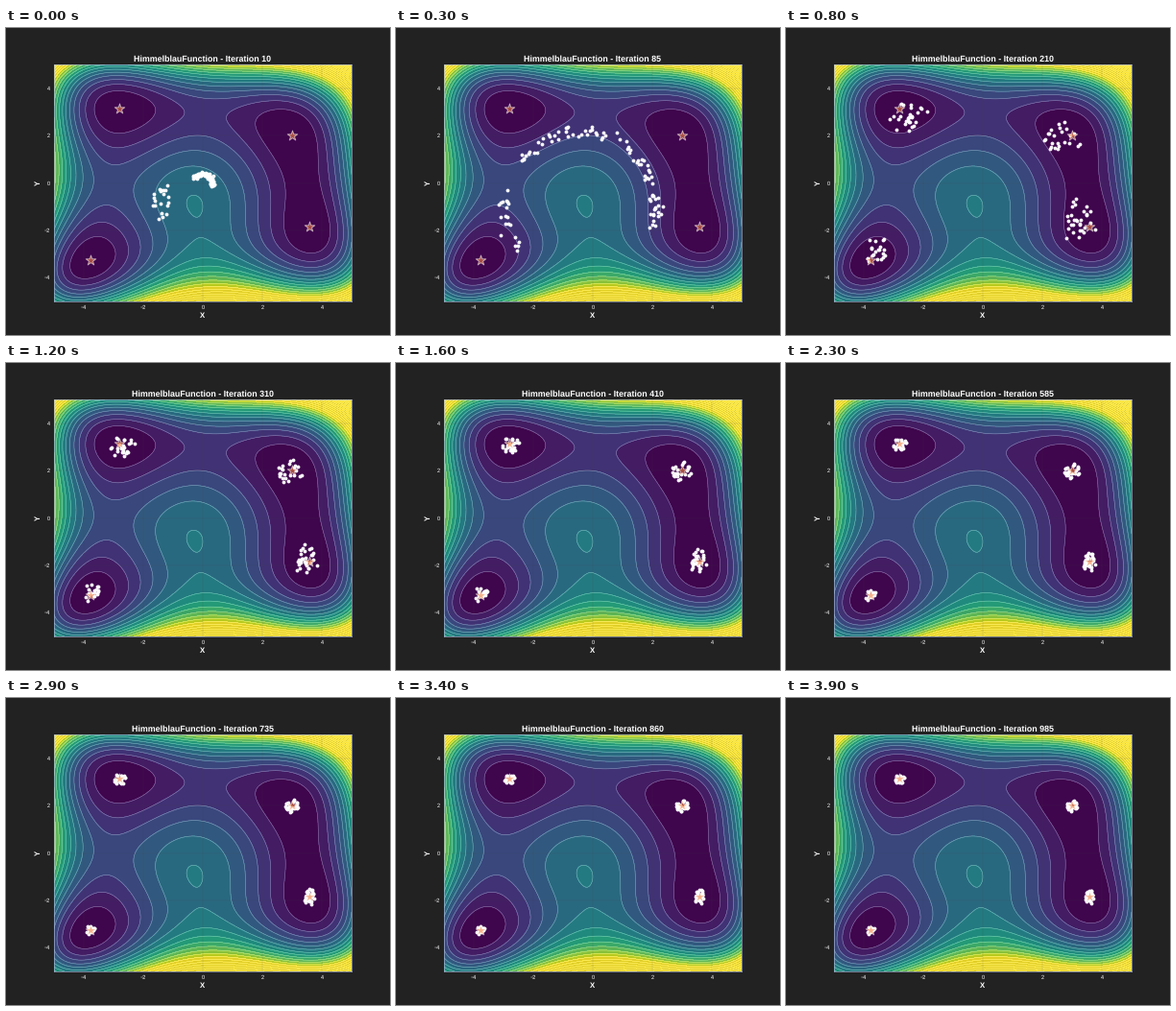
These frames come from a looping animation (400x320 px, 4 s). A matplotlib script:

```python
import numpy as np
import matplotlib.pyplot as plt
from matplotlib.animation import FuncAnimation

plt.rcParams["font.family"] = "Liberation Sans"
plt.rcParams["text.hinting"] = "none"

FRAMES, INTERVAL = 40, 100
RING_TIME = 3  # frames the swarm needs to spread into a ring
BACKGROUND = "#222222"
rng = np.random.default_rng(7)

# minimum, particle count, range of ring angles, final spread, initial reach
GROUPS = [
    ((-2.805, 3.131), 28, (85, 142), (0.31, 0.32), 0.13),
    ((3.000, 2.000), 24, (30, 92), (0.32, 0.48), 0.13),
    ((3.584, -1.848), 30, (-22, 28), (0.28, 0.52), 0.13),
    ((-3.779, -3.283), 20, (172, 220), (0.27, 0.30), 0.48),
]


def himmelblau(x, y):
    return (x**2 + y - 11) ** 2 + (x + y**2 - 7) ** 2


def polar(angle, rx, ry):
    return np.column_stack([rx * np.cos(angle), ry * np.sin(angle)])


def make_group(low, count, angles, spread, reach):
    """Start, ring position, minimum, offset and pull rate of each particle."""
    angle = np.radians(rng.uniform(*angles, count))
    ring = (-0.4, -1.0) + polar(angle, 2.55, 3.2)
    ring += rng.normal(0, 0.09, ring.shape)
    origin = np.array([0.05, 0.13])
    mix = reach * rng.uniform(0.8, 1.2, (count, 1))
    start = origin + mix * (ring - origin) + rng.normal(0, 0.04, ring.shape)
    radius = np.sqrt(rng.uniform(0, 1, (count, 1)))
    offset = radius * polar(rng.uniform(0, 2 * np.pi, count), *spread)
    rate = rng.uniform(0.2, 0.45, (count, 1))
    return start, ring, np.tile(low, (count, 1)), offset, rate


start, ring, low, offset, rate = map(
    np.concatenate, zip(*(make_group(*g) for g in GROUPS)))


def particles(frame):
    # Spread to the ring, then decay towards the minima in shrinking clusters
    spread = min(frame / RING_TIME, 1)
    base = start + spread * (ring - start)
    pull = 1 - np.exp(-rate * max(frame - RING_TIME, 0))
    scatter = min(frame / 8, 1) * (max(frame, 8) / 16) ** -0.65
    return base + pull * (low - base) + scatter * offset


fig, ax = plt.subplots(figsize=(10, 8), dpi=40, facecolor=BACKGROUND)
ax.set_facecolor(BACKGROUND)

axis = np.linspace(-5, 5, 200)
X, Y = np.meshgrid(axis, axis)
Z = himmelblau(X, Y)
levels = np.arange(0, 901, 30)
ax.contourf(X, Y, Z, levels=levels, cmap="viridis", vmin=15, vmax=405, alpha=0.88)
ax.contour(X, Y, Z, levels=levels, colors="white", linewidths=1, alpha=0.42)
ax.grid(color="#444444", linewidth=0.8, alpha=0.3)

dots = ax.scatter([], [], s=48, c="white", linewidths=0, alpha=0.95, zorder=3)
minima = np.array([g[0] for g in GROUPS])
ax.scatter(*minima.T, marker="*", s=400, c="#f08040", edgecolors="white",
           linewidths=1.7, alpha=0.6, zorder=4)

ticks = range(-4, 5, 2)
ax.set(xlim=(-5, 5), ylim=(-5, 5), xticks=ticks, yticks=ticks)
ax.tick_params(length=0, pad=7, labelsize=10, labelcolor="white")
bold = dict(fontweight="bold", color="white")
ax.set_xlabel("X", fontsize=14, **bold)
ax.set_ylabel("Y", fontsize=14, **bold)
title = ax.set_title("", fontsize=16, **bold)
for spine in ax.spines.values():
    spine.set(color="#a9b4d6", linewidth=1.2)


def update(frame):
    dots.set_offsets(particles(frame))
    title.set_text(f"HimmelblauFunction - Iteration {10 + 25 * frame}")
    return dots, title


anim = FuncAnimation(fig, update, frames=FRAMES, interval=INTERVAL,
                     repeat=True, repeat_delay=0, blit=False)
plt.show()
```
